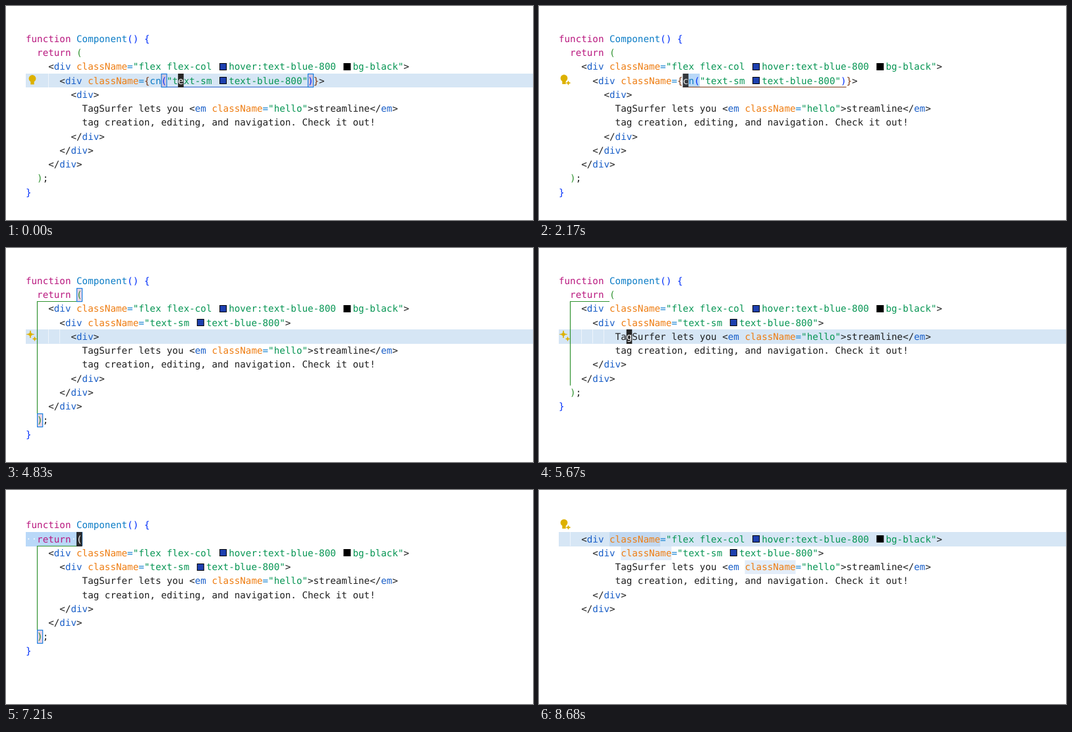
Animation, 800 px wide and 326 px high, one loop 8750 ms. Source, as an HTML page with a canvas:

```html
<!DOCTYPE html>
<html lang="en">
<head>
<meta charset="utf-8">
<title>Code editor demo</title>
<style>
  html, body { margin: 0; width: 100%; height: 100%; overflow: hidden; background: #fff; }
  canvas { display: block; width: 800px; height: 326px; }
</style>
</head>
<body>
<canvas id="stage" width="800" height="326"></canvas>
<script>
const ctx = document.getElementById('stage').getContext('2d');
const LOOP = 8750, WIDTH = 800, LEFT = 30, TOP = 39.4, CHAR = 8.56, LINE = 21.27;
const FONT = '14.22px "DejaVu Sans Mono", monospace';
const BRACKETS = ['#0431fa', '#319331', '#7b3814'];
const SWATCHES = { '■': '#1e40af', '●': '#000' };
const GOLD = '#ddb100';

// ■ and ● stand for colour swatches, each two columns wide.
const wrapped = [
  'function Component() {',
  '  return (',
  '    <div className="flex flex-col ■hover:text-blue-800 ●bg-black">',
  '      <div className={cn("text-sm ■text-blue-800")}>',
  '        <div>',
  '          TagSurfer lets you <em className="hello">streamline</em>',
  '          tag creation, editing, and navigation. Check it out!',
  '        </div>',
  '      </div>',
  '    </div>',
  '  );',
  '}',
];
const unwrapped = wrapped.map(line => line.replace('{cn(', '').replace(')}', ''));
const flattened = unwrapped.filter((line, i) => i !== 4 && i !== 7);
const bare = ['', ...flattened.slice(2, 8)];

// One alternative per colour, in the same order as COLORS.
const TOKENS = /(".*?")|(?<=<\/?)(\w+)|(className)|(=)|(Component|\bcn\b)|(function|return)|([(){}])|\w+|./g;
const COLORS = ['#069553', '#1a5fc8', '#ee7d12', '#0f7fd0', '#0b7cc6', '#b9187f'];

function tokenize(doc) {
  let depth = 0;
  return doc.map(line => [...line.matchAll(TOKENS)].map(([text, ...groups]) => {
    const kind = groups.findIndex(Boolean);
    let color = COLORS[kind] || '#1f1f1f';
    if (kind === 6) {
      if (')}'.includes(text)) depth--;
      color = BRACKETS[depth % 3];
      if ('({'.includes(text)) depth++;
    }
    return { text, color };
  }));
}
const docs = Object.fromEntries(
  Object.entries({ wrapped, unwrapped, flattened, bare }).map(([name, doc]) => [name, tokenize(doc)]));

const pair = (open, close, color, boxed = true) => ({ open, close, color, boxed });
const callPair = pair([3, 24], [3, 50], '#2a62c9');
const bracePair = pair([3, 21], [3, 51], BRACKETS[2], false);
const returnPair = lastRow => pair([1, 9], [lastRow, 2], BRACKETS[1]);

// Each step changes part of the state; a move also restarts the cursor blink.
const steps = [{
  time: 0, moved: -170, doc: 'wrapped', row: 3, col: 27, scroll: 0,
  pair: callPair, icon: 'bulb', selection: null, words: false,
}];
const show = (time, change) => steps.push({ ...steps.at(-1), time, ...change });
const move = (time, change) => show(time, { moved: time, ...change });

move(770, { col: 26 });
move(840, { col: 25 });
move(910, { col: 24 });
move(1750, { col: 23, selection: [23, 25], icon: '' });
move(1850, { col: 22, selection: [22, 25], pair: bracePair, icon: 'bulbSparkle' });
move(2940, { doc: 'unwrapped', col: 21, selection: null, pair: returnPair(10), icon: 'bulb' });
move(4400, { row: 4, col: 12, icon: '' });
show(4480, { icon: 'sparkles' });
move(5110, { selection: [0, 13] });
move(5600, { doc: 'flattened', selection: null, pair: { ...returnPair(8), boxed: false } });
show(5740, { pair: returnPair(8) });
move(6580, { row: 3, icon: '' });
move(6720, { row: 2 });
move(6790, { row: 1, col: 9, scroll: 3.6 });
move(6900, { selection: [0, 10] });
move(8080, { doc: 'bare', selection: null, pair: null });
show(8330, { icon: 'bulbSparkle', iconRow: 0 });
show(8680, { words: true });

const colX = col => LEFT + col * CHAR;
const rowY = (row, scroll) => TOP + scroll + row * LINE;
const ease = p => p * p * (3 - 2 * p);

function fillCells(row, from, to, color, scroll) {
  const y = Math.round(rowY(row, scroll)), x = colX(from);
  ctx.fillStyle = color;
  ctx.fillRect(x, y, colX(to) - x, Math.round(rowY(row + 1, scroll)) - y);
}

function drawLine(tokens, row, scroll, override) {
  const y = rowY(row, scroll);
  let col = 0;
  for (const { text, color } of tokens) {
    for (const ch of text) {
      const x = colX(col);
      if (SWATCHES[ch]) {
        ctx.fillStyle = '#000';
        ctx.fillRect(x + 3, Math.round(y + 4.8), 11, 11);
        ctx.fillStyle = SWATCHES[ch];
        ctx.fillRect(x + 4, Math.round(y + 5.8), 9, 9);
        col++;
      } else if (ch !== ' ') {
        ctx.fillStyle = override || color;
        ctx.fillText(ch, x, y + 15.3);
      }
      col++;
    }
  }
}

function drawPair({ open, close, color, boxed }, scroll) {
  const under = Math.round(rowY(open[0] + 1, scroll)) - 0.5;
  ctx.strokeStyle = color;
  ctx.lineWidth = 1.2;
  ctx.beginPath();
  if (open[0] === close[0]) {
    ctx.moveTo(colX(open[1] + 1), under);
    ctx.lineTo(colX(close[1]), under);
  } else {
    ctx.moveTo(colX(open[1]), under);
    ctx.lineTo(47.5, under);
    ctx.lineTo(47.5, rowY(close[0], scroll));
  }
  ctx.stroke();
  if (!boxed) return;
  for (const [row, col] of [open, close]) {
    fillCells(row, col, col + 1, 'rgba(200,150,190,.4)', scroll);
    ctx.strokeStyle = '#1a7fe0';
    ctx.strokeRect(colX(col) + 0.5, Math.round(rowY(row, scroll)) + 0.5, CHAR - 0.5, LINE - 1.2);
  }
}

function star(x, y, r) {
  ctx.beginPath();
  ctx.moveTo(x, y - r);
  for (const [dx, dy] of [[r, 0], [0, r], [-r, 0], [0, -r]]) {
    ctx.quadraticCurveTo(x, y, x + dx, y + dy);
  }
  ctx.lineWidth = 1;
  ctx.stroke();
  ctx.fill();
}

function bulb(x, y) {
  ctx.beginPath();
  ctx.arc(x, y, 5.4, 0, 7);
  ctx.fill();
  ctx.fillRect(x - 2.7, y + 4, 5.4, 5);
}

function drawIcon(icon, y) {
  ctx.fillStyle = ctx.strokeStyle = GOLD;
  if (icon === 'bulb') bulb(40, y + 7.3);
  if (icon === 'bulbSparkle') {
    bulb(38, y + 6.8);
    star(44.5, y + 14, 3);
  }
  if (icon === 'sparkles') {
    star(37, y + 7, 5.5);
    star(43.5, y + 14, 3);
  }
}

function cursorAlpha(idle) {
  if (idle < 300) return 1;
  const phase = (idle - 300) % 500;
  if (phase < 100) return 1 - ease(phase / 100);
  if (phase < 300) return 0;
  return phase < 400 ? ease((phase - 300) / 100) : 1;
}

function drawCursor(s, time) {
  ctx.save();
  ctx.globalAlpha = cursorAlpha(time - s.moved);
  fillCells(s.row, s.col, s.col + 1, '#262626', s.scroll);
  ctx.beginPath();
  ctx.rect(colX(s.col), rowY(s.row, s.scroll), CHAR, LINE);
  ctx.clip();
  drawLine(docs[s.doc][s.row], s.row, s.scroll, '#fff');
  ctx.restore();
}

function drawActiveRow(s, indent) {
  const y = Math.round(rowY(s.row, s.scroll));
  if (!s.selection) {
    ctx.fillStyle = '#d6e6f5';
    ctx.fillRect(LEFT, y, WIDTH - LEFT, Math.round(rowY(s.row + 1, s.scroll)) - y);
    ctx.fillStyle = 'rgba(255,255,255,.6)';
    for (let col = Math.min(4, indent - 2); col < indent; col += 2) {
      ctx.fillRect(Math.round(colX(col)), y, 1, LINE);
    }
    return;
  }
  const [from, to] = s.selection;
  fillCells(s.row, from, to, '#b9d8f8', s.scroll);
  ctx.fillStyle = '#fff';
  const text = docs[s.doc][s.row].map(token => token.text).join('');
  for (let col = from; col < to; col++) {
    if (text[col] !== ' ') continue;
    ctx.beginPath();
    ctx.arc(colX(col + 0.5), y + 10.6, 1, 0, 7);
    ctx.fill();
  }
}

function draw(time) {
  const s = steps.findLast(step => step.time <= time);
  const lines = docs[s.doc];
  ctx.fillStyle = '#fff';
  ctx.fillRect(0, 0, WIDTH, 326);
  ctx.font = FONT;
  ctx.textRendering = 'geometricPrecision';

  drawActiveRow(s, lines[s.row].findIndex(token => token.text !== ' '));
  if (s.words) {
    for (const [row, col] of [[1, 9], [2, 11], [3, 33]]) {
      fillCells(row, col, col + 9, 'rgba(90,150,220,.17)', s.scroll);
    }
  }
  if (s.pair) drawPair(s.pair, s.scroll);
  lines.forEach((tokens, row) => drawLine(tokens, row, s.scroll));
  drawIcon(s.icon, rowY(s.iconRow ?? s.row, s.scroll));
  drawCursor(s, time);
}

function frame() {
  draw(performance.now() % LOOP);
  requestAnimationFrame(frame);
}
frame();
</script>
</body>
</html>
```
